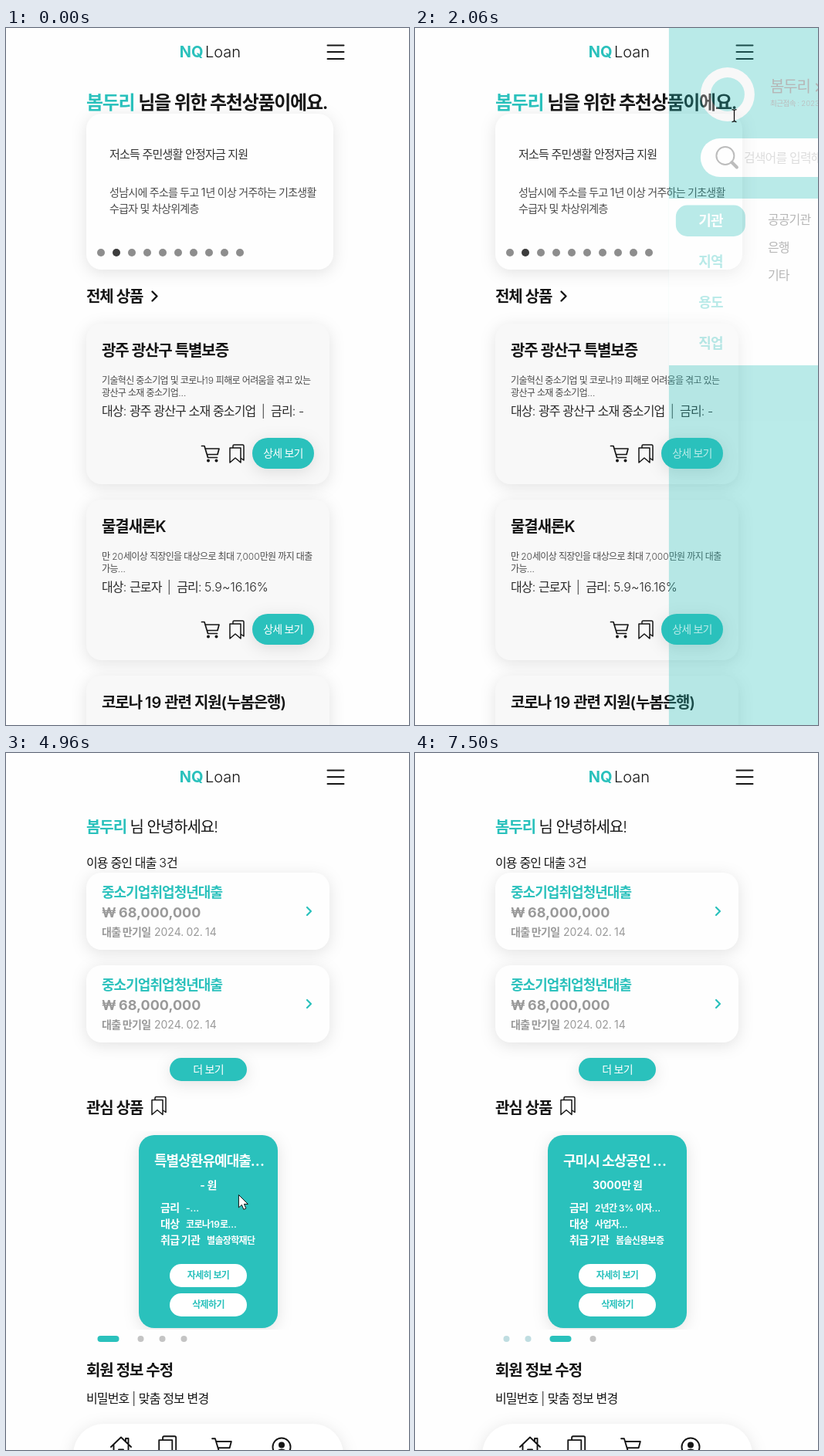
Recreate the animation shown at these times as an HTML page. Size 522x903 px, loop 7900 ms.

```html
<!DOCTYPE html>
<html lang="ko">
<head>
<meta charset="utf-8">
<style>
html, body { margin: 0; width: 100%; height: 100%; overflow: hidden; background: #fefefe; }
svg { display: block; width: 522px; height: 903px; }
text { font-family: Inter, "Noto Sans CJK KR", "Noto Sans CJK", sans-serif; white-space: pre; }
.ko { letter-spacing: -.053em; }
.shade { filter: drop-shadow(0 4px 10px rgba(0, 0, 0, .11)); }
.line { fill: none; stroke-linejoin: round; stroke-linecap: round; }
</style>
</head>
<body>
<svg id="stage" viewBox="0 0 522 903"></svg>
<script>
const LOOP = 7900, TEAL = '#2ac1bc', INK = '#151515', SOFT = '#4a4a4a', USER = '봄두리';
const PANEL_WIDTH = 375, PANEL_LEFT = 74, SLIDE_GAP = 315;

// Hangul and spaces are set tighter than Latin.
const runs = s => s.replace(/[가-힣 ]+/g, m => `<tspan class="ko">${m}</tspan>`);
const text = (x, y, size, s, weight = 400, fill = INK, anchor = 'start') =>
  `<text x="${x}" y="${y}" font-size="${size}" font-weight="${weight}" fill="${fill}" text-anchor="${anchor}">${runs(s)}</text>`;
const rect = (x, y, w, h, r, fill, cls = '') =>
  `<rect x="${x}" y="${y}" width="${w}" height="${h}" rx="${r}" fill="${fill}" class="${cls}"/>`;
const circle = (x, y, r, fill) => `<circle cx="${x}" cy="${y}" r="${r}" fill="${fill}"/>`;
const line = (d, stroke = INK, width = 1.7) =>
  `<path class="line" d="${d}" stroke="${stroke}" stroke-width="${width}"/>`;
const at = (x, y, content, scale = 1) => `<g transform="translate(${x} ${y}) scale(${scale})">${content}</g>`;
const group = (id, content) => `<g id="${id}">${content}</g>`;

const cart = line('M1 2H4.5L9 17H21M5.5 5.5H23.5L21.5 13H8') + circle(9.5, 21, 2, INK) + circle(20, 21, 2, INK);
const bookmark = line('M1 5H15V24L8 18 1 24ZM5 5V2.5Q5 1 6.5 1H17.5Q19 1 19 2.5V21L15.5 18.5', INK, 1.5);
const home = line('M1 14 14 1.5 27 14M4.5 11.5V26H11V17.5H17V26H23.5V11.5M20 6V3H23.5V9.5', INK, 1.9);
const person = `<circle r="11.5" fill="none" stroke="${INK}" stroke-width="2"/>` + circle(0, -2.5, 4, INK) +
  `<path d="M-7.5 7Q-5 2.5 0 2.5T7.5 7Q4 10.5 0 10.5T-7.5 7Z" fill="${INK}"/>`;
const chevron = (x, y, h, color, width) => line(`M${x} ${y - h}l${h} ${h}l${-h} ${h}`, color, width);

const header = text(304, 38, 20, 'Loan', 300, INK, 'end') + text(255.5, 38, 20, 'NQ', 700, TEAL, 'end') +
  line('M416.5 22.5H437.5M416.5 31H437.5M416.5 40H437.5', INK, 2);

const navBar = y => at(0, y,
  rect(87, 0, 350, 80, 40, '#fff', 'shade') + at(135, 16, home) + at(197, 15, bookmark, 1.22) +
  at(266, 17, cart, 1.1) + at(357, 30, person) +
  [[149, '홈'], [210.5, '관심 상품'], [280, '장바구니'], [357, '마이 페이지']]
    .map(([x, s]) => text(x, 59, 14, s, 400, '#333', 'middle')).join(''));

const productCard = ([title, desc1, desc2, facts], i) => at(104, 383 + 228 * i,
  rect(0, 0, 315, 208, 20, '#f8f8f8', 'shade') + text(20, 42, 20, title, 600) +
  text(20, 78, 12, desc1, 300, SOFT) + text(20, 94, 12, desc2, 300, SOFT) + text(20, 119, 16, facts, 300, '#2a2a2a') +
  at(148.5, 156.5, cart) + at(185, 156, bookmark) +
  rect(215, 148, 80, 40, 20, TEAL, 'shade') + text(255, 173, 14, '상세 보기', 500, '#fff', 'middle'));

const products = [
  ['광주 광산구 특별보증', '기술혁신 중소기업 및 코로나19 피해로 어려움을 겪고 있는', '광산구 소재 중소기업...',
    '대상: 광주 광산구 소재 중소기업  |  금리: -'],
  ['물결새론K', '만 20세이상 직장인을 대상으로 최대 7,000만원 까지 대출', '가능...',
    '대상: 근로자  |  금리: 5.9~16.16%'],
  ['코로나 19 관련 지원(누봄은행)', '코로나19 관련 직·간접피해 중소기업 및 소상공인, 수출입/', '여행/숙박/관광 등 업종 제한사항 없음...',
    '대상: 소상공인, 중소기업...  |  금리: -'],
];

const homePage = header +
  rect(104, 111, 320, 202, 20, '#fefefe', 'shade') +
  text(104, 105, 24, USER, 600, TEAL) + text(166.5, 105, 24, ' 님을 위한 추천상품이에요.', 600) +
  text(134, 169, 15, '저소득 주민생활 안정자금 지원', 400, '#333') +
  text(134, 218, 14, '성남시에 주소를 두고 1년 이상 거주하는 기초생활', 400, SOFT) +
  text(134, 239, 14, '수급자 및 차상위계층', 400, SOFT) +
  Array.from({ length: 10 }, (_, i) => circle(123 + 20 * i, 291, 5, i === 1 ? '#3c3c3c' : '#8d8d8d')).join('') +
  text(104, 355, 20, '전체 상품', 600) + chevron(189.5, 347.5, 6, INK, 2.4) +
  products.map(productCard).join('') + navBar(1067);

const loanCard = y => at(104, y,
  rect(0, 0, 315, 100, 20, '#fefefe', 'shade') + text(20, 32, 18, '중소기업취업청년대출', 600, TEAL) +
  text(20, 58, 18, '₩ 68,000,000', 700, '#999') + text(20, 82, 14, '대출 만기일', 700, '#999') +
  text(88, 82, 14, '2024. 02. 14', 400, '#999') + chevron(286, 50, 5, TEAL, 2.2));

const slides = [
  ['특별상환유예대출...', '- 원', '-...', '코로나19로...', '별솔장학재단'],
  ['청년 전월세 보증 ...', '5000만 원', '연 2% 이내...', '무주택자...', '솔빛주거재단'],
  ['구미시 소상공인 ...', '3000만 원', '2년간 3% 이자...', '사업자...', '봄솔신용보증'],
];
const pillButton = (y, s) => rect(40, y, 100, 30, 15, '#fff') + text(90, y + 19, 12, s, 600, TEAL, 'middle');
const slideCard = ([title, amount, rate, target, agency], i) => at(172 + SLIDE_GAP * i, 495,
  rect(0, 0, 180, 250, 20, TEAL, 'shade') + text(20, 40, 18, title, 700, '#fff') +
  text(90, 70, 14, amount, 700, '#fff', 'middle') +
  [['금리', rate, 61], ['대상', target, 61], ['취급 기관', agency, 88]].map(([label, value, x], k) =>
    text(28, 99 + 21 * k, 14, label, 700, '#fff') + text(x, 99 + 21 * k, 12, value, 600, '#fff')).join('') +
  pillButton(167, '자세히 보기') + pillButton(205, '삭제하기'));

const myPage = header + text(104, 103, 20, USER, 600, TEAL) + text(156, 103, 20, ' 님 안녕하세요!', 300) +
  text(104, 148, 16, '이용 중인 대출 3건', 300) + loanCard(155) + loanCard(275) +
  rect(212, 395, 100, 30, 15, TEAL, 'shade') + text(262, 415, 14, '더 보기', 400, '#fff', 'middle') +
  text(104, 467, 20, '관심 상품', 600) + at(188, 444.5, bookmark) +
  `<g clip-path="url(#window)">${group('track', slides.map(slideCard).join(''))}</g>` +
  group('dots', rect(0, 755, 28, 8, 4, TEAL) + circle(0, 759, 4, '#c4c4c4').repeat(3)) +
  text(104, 807, 20, '회원 정보 수정', 600) + text(104, 842, 16, '비밀번호 | 맞춤 정보 변경', 300) + navBar(869);

const tabs = ['기관', '지역', '용도', '직업'];
const links = [[128, 254, '공공기관'], [128, 290, '은행'], [128, 326, '기타'], [249, 254, '여신금융회사'], [249, 290, '일반기관']];
const panel = rect(0, 0, PANEL_WIDTH, 903, 0, TEAL) + rect(0, 221, PANEL_WIDTH, 216, 0, '#fff') +
  line('M300 20V16H317.5V39H300V35M310 27.5H293M298.5 22 293 27.5 298.5 33', '#fff', 2.4) +
  line('M340 18 358 37M358 18 340 37', '#fff', 2.4) +
  circle(76, 86, 35, '#eee') + circle(76, 86, 22, TEAL) +
  text(131, 83, 20, USER, 300, '#222') + chevron(191, 77, 4.5, '#222', 1.8) +
  text(131, 101, 9.6, '최근접속 : 2023. 2. 24. 오후 6:04:25', 300, '#333') +
  rect(41, 143, 300, 50, 25, '#fff') +
  '<circle cx="73" cy="165.5" r="11.5" fill="none" stroke="#333" stroke-width="2"/>' +
  line('M81.5 174 88 180.5', '#333', 4) +
  text(97, 174, 16, '검색어를 입력해주세요', 400, '#999') + rect(9, 229.5, 90, 40.5, 15, TEAL) +
  tabs.map((s, i) => text(54, 256 + 53 * i, 18, s, 700, i ? TEAL : '#fff', 'middle')).join('') +
  links.map(([x, y, s]) => text(x, y, 16, s, 300, '#222')).join('');

const pointers = {
  arrow: '<path d="M0 0V16.5L4 13 6.5 19 9.5 17.5 7 12H12Z" fill="#fff" stroke="#111" stroke-linejoin="round"/>',
  hand: '<path d="M-1.5 1Q0-1 1.5 1V8Q4 6.5 5 8.5 7.5 7.5 8.5 9.5 11.5 9 11.5 12V17Q11 20 9 23H0Q-3 18-6 13.5-6 10.5-2.5 12L-1.5 13Z" fill="#fff" stroke="#111"/><path d="M2 15V19M5 15V19M8 15V19" stroke="#111"/>',
  beam: '<path d="M-3 0Q0 0 0 2 0 0 3 0M0 2V14M-3 16Q0 16 0 14 0 16 3 16" fill="none" stroke="#111" stroke-width="1.3"/>',
};

const stage = document.getElementById('stage');
stage.innerHTML = '<defs><clipPath id="window"><rect x="104" y="490" width="315" height="257"/></clipPath></defs>' +
  group('home', homePage) + group('mine', myPage) + group('panel', panel) +
  group('pointer', Object.keys(pointers).map(k => group(k, pointers[k])).join(''));
const $ = id => document.getElementById(id);
const show = (el, on) => el.setAttribute('display', on ? 'inline' : 'none');
const move = (el, x, y) => el.setAttribute('transform', `translate(${x} ${y})`);

const clamp = v => Math.min(1, Math.max(0, v));
const bezier = (a, b, s) => 3 * a * s * (1 - s) ** 2 + 3 * b * s * s * (1 - s) + s ** 3;
// CSS "ease" timing from start over a duration.
function ease(t, start, duration = 500) {
  const p = clamp((t - start) / duration);
  let lo = 0, hi = 1;
  for (let i = 0; i < 20; i++) {
    const mid = (lo + hi) / 2;
    if (bezier(.25, .25, mid) < p) lo = mid; else hi = mid;
  }
  return p === 0 || p === 1 ? p : bezier(.1, 1, lo);
}

// time, x, y, pointer shape from this moment on
const path = [
  [70, 474, 862, 'arrow'], [200, 400, 640, 'arrow'], [330, 364, 400, 'arrow'], [470, 396, 150, 'arrow'], [620, 428, 30, 'hand'],
  [830, 428, 30, 'hand'], [960, 430, 40, 'arrow'], [1200, 430, 40, 'arrow'], [1580, 424, 27, 'hand'],
  [1860, 424, 27, 'arrow'], [2040, 413, 104, 'beam'], [2080, 413, 106, 'beam'], [2200, 416, 150, 'arrow'], [2540, 430, 330, 'arrow'],
  [2610, 432, 340, 'arrow'], [3000, 430, 600, 'arrow'], [3320, 376, 846, 'hand'],
  [3520, 376, 846, 'arrow'], [3750, 380, 600, 'arrow'], [4190, 383, 88, 'arrow'],
  [4260, 382, 90, 'arrow'], [4600, 330, 400, 'arrow'], [4820, 303, 610, 'arrow'], [4950, 301, 571, 'arrow'],
  [5060, 300, 580, 'arrow'], [5350, 72, 610, 'arrow'], [5500, 72, 610, 'arrow'], [5860, 300, 618, 'arrow'],
  [5930, 300, 618, 'arrow'], [6170, 110, 615, 'arrow'], [6480, 110, 615, 'arrow'], [6690, 138, 600, 'arrow'],
  [6750, 150, 605, 'arrow'], [6960, 295, 738, 'arrow'], [7160, 288, 712, 'arrow'], [7500, 474, 848, 'arrow'],
];
function pointerAt(t) {
  let i = 0;
  while (i < path.length - 2 && path[i + 1][0] <= t) i++;
  const [t0, x0, y0, shape] = path[i], [t1, x1, y1] = path[i + 1];
  const p = clamp((t - t0) / (t1 - t0));
  return { x: x0 + (x1 - x0) * p, y: y0 + (y1 - y0) * p, shape };
}

// Drag start, release; the slide follows the pointer, then settles.
const drags = [[5060, 5350], [5930, 6170]];
function swipe([start, release], t) {
  if (t < start) return 0;
  const dragged = pointerAt(start).x - pointerAt(Math.min(t, release)).x;
  return dragged + (SLIDE_GAP - dragged) * ease(t, release);
}

function drawDots(active) {
  const [pill, ...dots] = $('dots').children;
  pill.setAttribute('x', 118.5 + 28 * active);
  dots.forEach((dot, i) => {
    const before = i < active;
    dot.setAttribute('cx', 118.5 + 28 * (before ? i : i + 2));
    dot.setAttribute('fill', before ? '#bfdde1' : '#c4c4c4');
  });
}

function draw(t) {
  const mine = t >= 3500;
  show($('home'), !mine);
  show($('mine'), mine);
  move($('home'), 0, -237 * ease(t, 2610, 450));
  move($('mine'), 0, -39 * (1 - ease(t, 3800, 300)));

  const open = ease(t, 850) - ease(t, 1862);
  show($('panel'), open > 0);
  move($('panel'), PANEL_LEFT + PANEL_WIDTH * (1 - open), 0);
  $('panel').setAttribute('opacity', open);

  move($('track'), -drags.reduce((sum, d) => sum + swipe(d, t), 0), 0);
  drawDots(drags.filter(d => t >= d[1]).length);

  const pointer = pointerAt(t);
  show($('pointer'), t >= 70 && t < 7500);
  move($('pointer'), pointer.x + .5, pointer.y + .5);
  Object.keys(pointers).forEach(k => show($(k), k === pointer.shape));
}

const began = performance.now();
function tick() {
  draw((performance.now() - began) % LOOP);
  requestAnimationFrame(tick);
}
tick();
</script>
</body>
</html>
```
